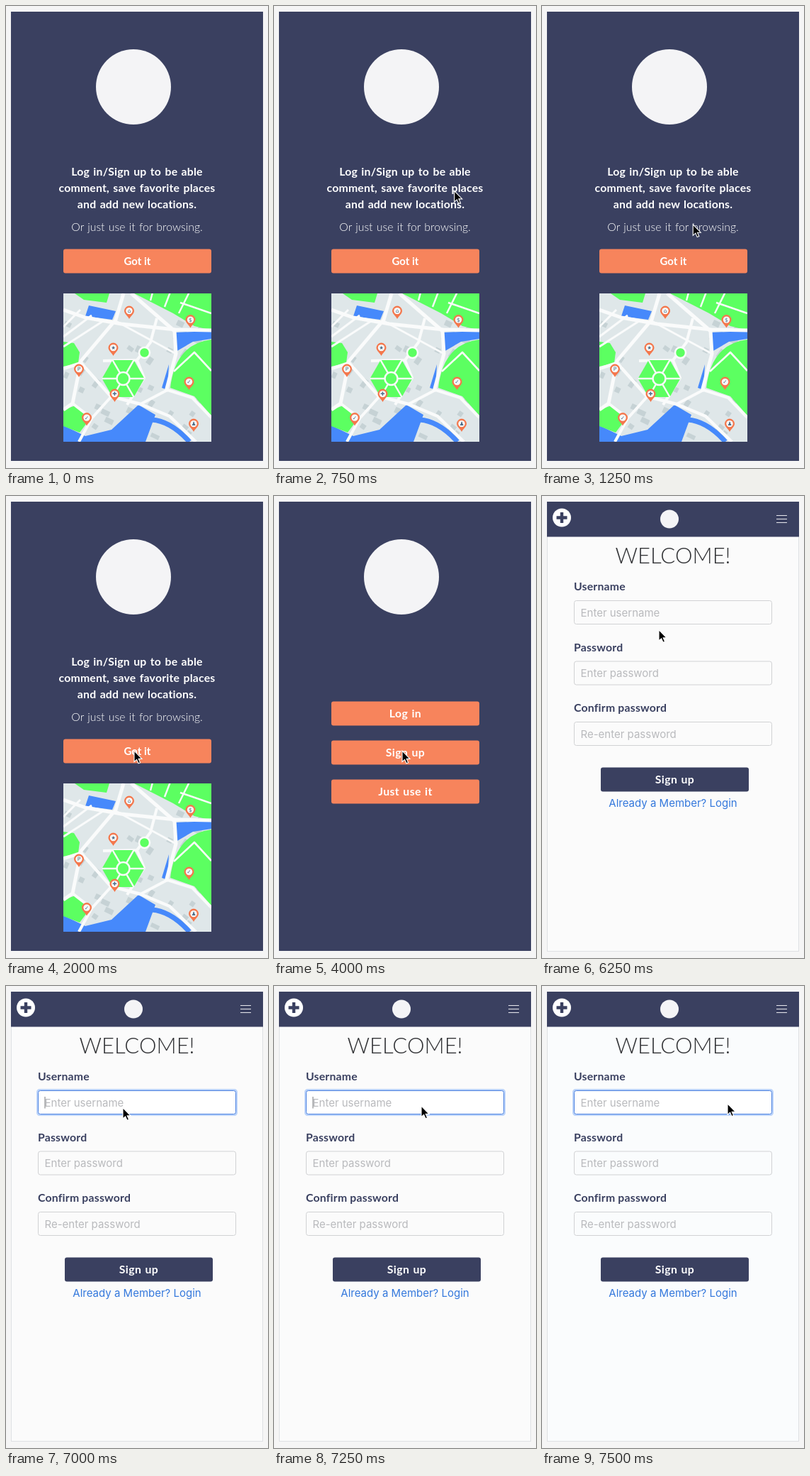
Animation, 370 px wide and 651 px high, one loop 8000 ms. Source, as an HTML page:

```html
<!DOCTYPE html>
<html lang="en">
<head>
<meta charset="utf-8">
<title>Sign up flow</title>
<style>
  html, body { margin: 0; width: 100%; height: 100%; overflow: hidden; background: #f5f5f5; }
  svg { display: block; width: 100%; height: 100%; }
  text { font-family: Lato, "Open Sans", sans-serif; font-size: 15.8px; }
  .mid { text-anchor: middle; }
  .bold { font-weight: 700; }
  .lead { letter-spacing: .2px; word-spacing: 1.3px; fill: #fff; }
  .soft { font-weight: 300; word-spacing: 1px; fill: #fff; }
  .label { letter-spacing: .2px; fill: #3a4060; }
  .action { letter-spacing: .4px; word-spacing: 1px; fill: #fff; }
  .title { font-size: 31px; font-weight: 300; fill: #303134; }
  .field, .link { font-family: Inter, Roboto, sans-serif; font-size: 15px; }
  .field { fill: #b9babd; }
  .link { fill: #3478dc; }
  .icon { font: 7.5px "DejaVu Sans", sans-serif; fill: #4c6c87; }
  .line { fill: none; stroke-linejoin: round; }
</style>
</head>
<body>
<svg id="stage" viewBox="0 0 370 651" xmlns="http://www.w3.org/2000/svg"></svg>
<script>
const LOOP = 8000, STEP = 250;
const NAVY = '#3a4060', ORANGE = '#f7845c', GREEN = '#5cff61', BLUE = '#4689fb';
const PALE = '#f4f4f6', ROAD = '#fafbfb';

const rect = (x, y, w, h, fill, extra = '') =>
  `<rect x="${x}" y="${y}" width="${w}" height="${h}" fill="${fill}" ${extra}/>`;
const disc = (x, y, r, fill, extra = '') =>
  `<circle cx="${x}" cy="${y}" r="${r}" fill="${fill}" ${extra}/>`;
const shape = (d, fill, extra = '') => `<path d="${d}" fill="${fill}" ${extra}/>`;
const line = (d, width, color = ROAD) =>
  `<path class="line" d="${d}" stroke="${color}" stroke-width="${width}"/>`;
const text = (x, y, cls, s, extra = '') => `<text x="${x}" y="${y}" class="${cls}" ${extra}>${s}</text>`;
const group = (id, ...parts) => `<g id="${id}">${parts.join('')}</g>`;
const repeat = (n, make) => Array.from({ length: n }, (_, i) => make(i)).join('');
const button = (x, y, fill, label, extra = '') =>
  rect(x, y, 209, 34, fill, 'rx="3"') + text(x + 104.5, y + 22, 'mid bold action', label, extra);

function seeded(seed) {
  return () => (seed = seed * 16807 % 2147483647) / 2147483647;
}

function pin(x, y, icon) {
  return `<g transform="translate(${x} ${y})">` +
    shape('M0 11C-2 7-7 4-7-.4A7 7 0 0 1 7-.4C7 4 2 7 0 11Z', '#f4774c') +
    disc(0, -.4, 4.7, '#f7fafb') + text(0, 2.3, 'mid icon', icon) + '</g>';
}

function roundPark(x, y) {
  const at = (r, a) => `${x + r * Math.cos(a)} ${y + r * Math.sin(a)}`;
  const corners = Array.from({ length: 6 }, (_, i) => at(30, i * Math.PI / 3));
  return shape(`M${corners.join('L')}Z`, GREEN) +
    corners.map(c => line(`M${x} ${y}L${c}`, 2.4)).join('') +
    disc(x, y, 9, GREEN, `stroke="${ROAD}" stroke-width="2.6"`);
}

function city() {
  const random = seeded(11);
  const houses = repeat(44, () => {
    const x = 84 + random() * 200, y = 440 + random() * 168, tilt = random() < .5 ? 25 : -55;
    return rect(x, y, 6 + random() * 7, 6 + random() * 3, '#c6d2d5', `transform="rotate(${tilt} ${x} ${y})"`);
  });

  const water =
    shape('M117 422L155 430 150 442 112 437Z', BLUE) +
    shape('M239 460L290 458V469L264 473 240 487Z', BLUE) +
    shape('M230 505L220 538 228 541Z', BLUE) +
    shape('M81 591L112 606 149 597 187 562 211 576 197 614H81Z', BLUE) +
    line('M206 583Q233 585 259 614', 7, BLUE);

  const parks =
    shape('M181 405H290V457L266 451 236 433Z', GREEN) +
    shape('M97 405H146L142 418 110 414Z', GREEN) +
    shape('M81 473L96 475 104 488 102 503 81 508Z', GREEN) +
    shape('M81 569L98 563 119 581 104 601 81 592Z', GREEN) +
    shape('M290 470Q239 476 232 538L266 550 290 577Z', GREEN);

  const avenues =
    line('M81 428L112 439 163 448 239 456 290 457', 5) +
    line('M166 405L155 442 106 500 94 560 81 569', 5) +
    line('M177 405L238 458 240 490 226 543', 5) +
    line('M81 511L106 503 148 550 190 561 231 578 268 614', 4.5) +
    line('M137 500L185 499 204 474 213 440M185 499L195 524 171 562', 4) +
    line('M94 560L121 581 103 614M121 581L149 550M190 561L228 541 263 552 290 580', 4);

  const lanes =
    repeat(3, i => line(`M81 ${452 + 14 * i}L${105 + 16 * i} ${428 + 8 * i}`, 3)) +
    repeat(3, i => line(`M${204 + 20 * i} ${415 + 9 * i}l${9 + 4 * i} -34`, 2.4)) +
    line('M155 444L240 490M246 418L290 433M237 515L266 488 290 514', 2.6);

  const pins =
    pin(174, 430, '⌂') + pin(260.5, 442.5, '$') + pin(151.5, 482, '★') + pin(103, 512, 'P') +
    pin(153.5, 547, '✚') + pin(258.5, 530, '✓') + pin(114, 580.5, '✓') + pin(265, 589, '♟');

  return '<clipPath id="frame"><rect x="81" y="405" width="209" height="209"/></clipPath>' +
    '<g clip-path="url(#frame)">' + rect(81, 405, 209, 209, '#dfe7e9') +
    houses + water + parks + avenues + lanes + roundPark(165.5, 525) +
    disc(195.5, 488.5, 7.5, GREEN, `stroke="${ROAD}" stroke-width="2.5"`) + pins + '</g>';
}

const pitch = ['Log in/Sign up to be able', 'comment, save favorite places', 'and add new locations.'];
const intro = group('intro',
  pitch.map((s, i) => text(185, 239 + 23 * i, 'mid bold lead', s)).join(''),
  text(185, 317, 'mid soft', 'Or just use it for browsing.'),
  button(81, 342.5, ORANGE, 'Got it', 'style="font-size:15px;letter-spacing:0;word-spacing:0"'),
  city());

const menu = group('menu',
  ['Log in', 'Sign up', 'Just use it'].map((s, i) => button(81, 289.5 + 55 * i, ORANGE, s)).join(''));

const splash = group('splash', rect(7, 8, 356, 633, NAVY), disc(180, 114, 53, PALE), intro, menu);

const outline = (y, fill, stroke, grow = 0, width = 1) =>
  rect(45.5 - grow, y + .5 - grow, 279 + 2 * grow, 33 + 2 * grow, fill,
    `rx="3" stroke="${stroke}" stroke-width="${width}"`);

const fields = [['Username', 'Enter username'], ['Password', 'Enter password'], ['Confirm password', 'Re-enter password']];
const inputs = fields.map(([label, hint], i) => {
  const y = 147 + 85.5 * i;
  const focus = group('focus', outline(y, '#fff', '#bcd4fa', 1, 3), outline(y, '#fff', '#4a80df'));
  return text(45, y - 14, 'bold label', label) + outline(y, 'none', '#d1d2d4') +
    (i ? '' : focus) + text(54.5, y + 22.5, 'field', hint);
}).join('');

const form = group('form',
  rect(7.5, 8.5, 355, 633, '#fbfbfb', 'id="sheet" stroke="#dfe1e4"'),
  rect(7, 8, 356, 49.5, NAVY),
  disc(28, 30.5, 13, '#fff'),
  line('M20.5 30.5H35.5M28 23V38', 4.4, NAVY),
  disc(180, 32.5, 13, PALE),
  repeat(3, i => line(`M331 ${27.5 + 5 * i}H346`, 1, '#e6e7ec')),
  text(185, 95, 'mid title', 'WELCOME!'),
  inputs,
  rect(54.5, 156, 1, 16.5, '#77787c', 'id="caret"'),
  button(83, 382.5, NAVY, 'Sign up'),
  text(185, 438, 'mid link', 'Already a Member? Login'));

const pointer = group('cursor',
  shape('M0 0V15.5L3.6 12.3 6 17.8 8.6 16.7 6.2 11.4H11Z', '#000', 'stroke="#fff" stroke-width="1.1"'));

const stage = document.getElementById('stage');
stage.innerHTML = rect(0, 0, 370, 651, '#f5f5f5') + splash + form + pointer;

const el = id => document.getElementById(id);
const show = (id, on) => el(id).setAttribute('display', on ? 'inline' : 'none');

// Each move advances one point per step and rests on its last point.
const moves = [
  { from: 750, points: [[254.7, 260.5], [226.7, 286.5], [213.2, 307.8], [193.7, 341.5], [182.5, 356.8], [181, 359]] },
  { from: 6000, points: [[178, 335], [165, 188.5], [165, 171.5]] },
  { from: 7250, points: [[208, 169], [262, 165.8]] }
];

function pointerAt(t) {
  const move = moves.filter(m => m.from <= t).pop();
  if (!move) return null;
  const step = Math.floor((t - move.from) / STEP);
  return move.points[Math.min(step, move.points.length - 1)];
}

function draw(t) {
  show('splash', t < 5250);
  show('intro', t < 4000);
  show('menu', t >= 4000);
  show('form', t >= 5250);
  show('focus', t >= 7000);
  show('caret', t >= 7000 && t < 7500);
  el('sheet').setAttribute('fill', t < 7500 ? '#fbfbfb' : '#fafcfd');

  const spot = pointerAt(t);
  show('cursor', spot);
  if (spot) el('cursor').setAttribute('transform', `translate(${spot.join(' ')})`);
}

const start = performance.now();
function tick() {
  draw((performance.now() - start) % LOOP);
  requestAnimationFrame(tick);
}
tick();
</script>
</body>
</html>
```
